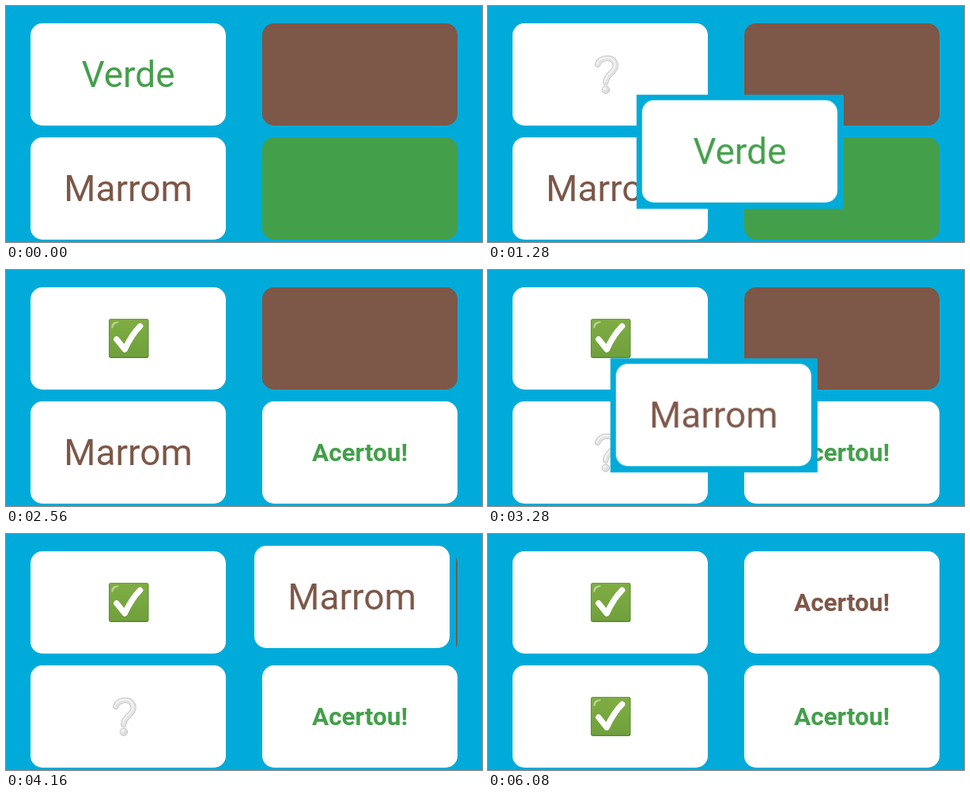
These frames come from a looping animation (602x300 px, 6400 ms). An HTML page:

```html
<!DOCTYPE html>
<html lang="pt">
<head>
<meta charset="utf-8">
<title>Jogo das cores</title>
<style>
  :root { --sky: #00abd9; --green: #449f4b; --brown: #7d5748; }
  html, body { margin: 0; width: 100%; height: 100%; overflow: hidden; background: var(--sky); }
  .stage { position: relative; width: 602px; height: 300px; overflow: hidden; background: var(--sky); }

  .card {
    position: absolute; width: 247px; height: 130px; border-radius: 15px;
    background: #fff; display: flex; align-items: center; justify-content: center;
    font-family: Roboto, "Open Sans", sans-serif; line-height: normal; white-space: nowrap;
  }
  .left { left: 31px; }
  .right { left: 324px; }
  .top { top: 22px; }
  .low { top: 167px; }
  .green { color: var(--green); }
  .brown { color: var(--brown); }
  .fill { background: currentColor; }
  .word { font-size: 46px; }
  .hit { font-size: 31.5px; font-weight: 700; }
  .card svg { width: 60px; height: 60px; }

  /* a dragged card carries a sky-coloured margin with it */
  .drag { box-shadow: none; }
  .drag::before { content: ""; position: absolute; z-index: -1; inset: -7.5px; background: var(--sky); }
  .drag::after { content: ""; position: absolute; z-index: -1; inset: 0; border-radius: 15px; background: #fff; }
  .drag { isolation: isolate; background: none; }

  .out1 { animation: out1 6.4s step-end infinite; }
  .in1 { animation: in1 6.4s step-end infinite; }
  .out2 { animation: out2 6.4s step-end infinite; }
  .in2 { animation: in2 6.4s step-end infinite; }
  .move1 { animation: move1 6.4s linear infinite, out1 6.4s step-end infinite; }
  .move2 { animation: move2 6.4s linear infinite, out2 6.4s step-end infinite; }

  @keyframes out1 { 0% { opacity: 1 } 40%, 100% { opacity: 0 } }
  @keyframes in1 { 0% { opacity: 0 } 40%, 100% { opacity: 1 } }
  @keyframes out2 { 0% { opacity: 1 } 82.5%, 100% { opacity: 0 } }
  @keyframes in2 { 0% { opacity: 0 } 82.5%, 100% { opacity: 1 } }

  @keyframes move1 {
    0% { transform: translate(0, 0) }
    10% { transform: translate(0, 0); animation-timing-function: cubic-bezier(.33, 0, .67, .4) }
    16.25% { transform: translate(73px, 42.5px); animation-timing-function: cubic-bezier(.33, .375, .67, .845) }
    25% { transform: translate(253px, 152px); animation-timing-function: cubic-bezier(.2, .6, .55, 1) }
    37.5%, 100% { transform: translate(291px, 145px) }
  }
  @keyframes move2 {
    0%, 43.75% { transform: translate(0, 0); animation-timing-function: cubic-bezier(.4, .1, .67, .7) }
    51.25% { transform: translate(130.5px, -47.5px); animation-timing-function: cubic-bezier(.33, .4, .67, .78) }
    60% { transform: translate(252.5px, -128.5px); animation-timing-function: cubic-bezier(.33, .49, .67, .79) }
    65% { transform: translate(283px, -152px); animation-timing-function: ease-out }
    67.5%, 100% { transform: translate(291px, -154.5px) }
  }
</style>
</head>
<body>
<svg width="0" height="0" style="position:absolute" aria-hidden="true">
  <defs>
    <linearGradient id="leaf" x1="0" y1="0" x2="0" y2="1">
      <stop offset="0" stop-color="#7fad43"/><stop offset="1" stop-color="#70a03c"/>
    </linearGradient>
    <linearGradient id="pearl" x1="0" y1="0" x2="1" y2="1">
      <stop offset="0" stop-color="#efefef"/><stop offset="1" stop-color="#d6d6d6"/>
    </linearGradient>
    <path id="hook" d="M13.2 17.4C15 11.5 20 9.3 25.5 9.3C32 9.3 35.6 13.5 35.6 18.8C35.6 28.5 23.8 29 23.3 40"/>
  </defs>
  <symbol id="ask" viewBox="0 0 60 60">
    <g fill="none" stroke-linecap="round" transform="translate(.5 0)">
      <use href="#hook" stroke="#bcbcbc" stroke-width="7.2"/>
      <use href="#hook" stroke="#e3e3e3" stroke-width="5.8"/>
      <use href="#hook" stroke="#f3f3f3" stroke-width="2" transform="translate(-.8 -.9)"/>
      <circle cx="23.4" cy="49.6" r="4.8" fill="url(#pearl)" stroke="#bcbcbc" stroke-width=".8"/>
      <circle cx="22.3" cy="48" r="1.5" fill="#fafafa"/>
    </g>
  </symbol>
  <symbol id="done" viewBox="0 0 60 60">
    <rect x="5" y="5" width="50.5" height="50" rx="3" fill="#5f8a35"/>
    <rect x="5.8" y="5.6" width="48.6" height="47.8" rx="2.6" fill="url(#leaf)"/>
    <path d="M8.3 15.5C8.5 11 11 8.6 16.5 8.2C18 8.2 18 9.7 16.6 10.2C12.8 11 11.2 12.8 10.5 16C10 17.5 8.4 17.2 8.3 15.5Z" fill="#b5d28a"/>
    <path d="M14.8 31L25.2 43.8C31 31.5 36 23 44.6 14.4" fill="none" stroke="#fff" stroke-width="7.4" stroke-linecap="round" stroke-linejoin="round"/>
  </symbol>
</svg>

<div class="stage">
  <div class="card left top out1"><svg><use href="#ask"/></svg></div>
  <div class="card left top in1"><svg><use href="#done"/></svg></div>

  <div class="card right top brown fill out2"></div>
  <div class="card right top brown hit in2">Acertou!</div>

  <div class="card left low out2"><svg><use href="#ask"/></svg></div>
  <div class="card left low in2"><svg><use href="#done"/></svg></div>

  <div class="card right low green fill out1"></div>
  <div class="card right low green hit in1">Acertou!</div>

  <div class="card left low drag brown word move2">Marrom</div>
  <div class="card left top drag green word move1">Verde</div>
</div>
</body>
</html>
```
